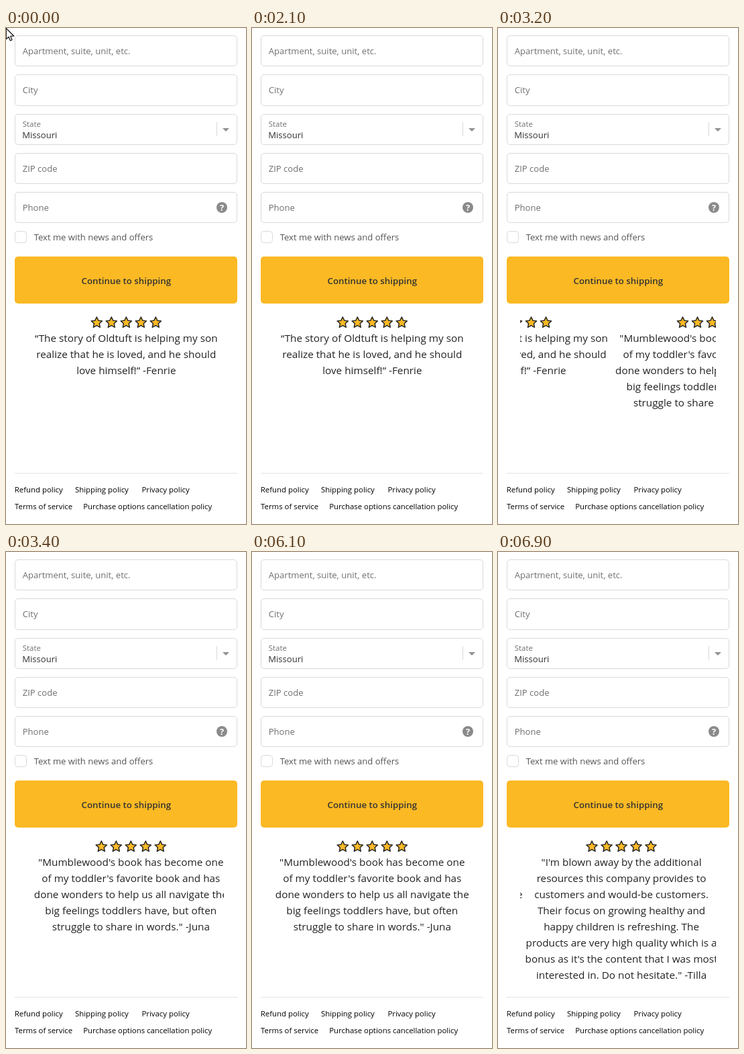
Recreate the animation shown at these times as an HTML page with a canvas. Size 358 by 738 pixels, loop 7000 ms.

```html
<!DOCTYPE html>
<html lang="en">
<head>
<meta charset="utf-8">
<title>Checkout form with reviews</title>
<style>
html, body { margin: 0; width: 100%; height: 100%; overflow: hidden; background: #fff; }
canvas { display: block; width: 358px; height: 738px; }
</style>
</head>
<body>
<canvas id="stage"></canvas>
<script>
const W = 358, H = 738, LOOP = 7000, STEP = 100;
const SLIDE_W = 292, SLIDE_MS = 515, SLIDE_STARTS = [2936, 6427];
const MID = 179.3, YELLOW = '#fbb924', BORDER = '#d9d9d9', GREY = '#707070', DARK = '#333';
const FIELD_TOP = 10.9, FIELD_PITCH = 58.3, FIELD_H = 46.3;

const canvas = document.getElementById('stage');
const ctx = canvas.getContext('2d');
const scale = window.devicePixelRatio || 1;
canvas.width = W * scale;
canvas.height = H * scale;

const reviews = [
  ['“The story of Oldtuft is helping my son', 'realize that he is loved, and he should',
   'love himself!” -Fenrie'],
  ['"Mumblewood\'s book has become one', 'of my toddler\'s favorite book and has',
   'done wonders to help us all navigate the', 'big feelings toddlers have, but often',
   'struggle to share in words." -Juna'],
  ['"I\'m blown away by the additional', 'resources this company provides to',
   'customers and would-be customers.', 'Their focus on growing healthy and',
   'happy children is refreshing. The', 'products are very high quality which is a',
   'bonus as it\'s the content that I was most', 'interested in. Do not hesitate." -Tilla']
];

function text(str, x, y, size, color, align = 'left', weight = 400) {
  ctx.font = `${weight} ${size}px "Open Sans", "Noto Sans", sans-serif`;
  ctx.textAlign = align;
  ctx.fillStyle = color;
  ctx.fillText(str, x, y);
}

function box(x, y, w, h, r, fill, stroke) {
  ctx.beginPath();
  ctx.roundRect(x, y, w, h, r);
  ctx.fillStyle = fill;
  ctx.fill();
  if (stroke) {
    ctx.strokeStyle = stroke;
    ctx.lineWidth = 1;
    ctx.stroke();
  }
}

function polygon(points, fill, stroke, width) {
  ctx.beginPath();
  points.forEach(([x, y]) => ctx.lineTo(x, y));
  ctx.closePath();
  ctx.fillStyle = fill;
  ctx.fill();
  if (stroke) {
    ctx.strokeStyle = stroke;
    ctx.lineWidth = width;
    ctx.lineJoin = 'round';
    ctx.stroke();
  }
}

// Edges snap to whole pixels, as page layout does.
function field(label, row) {
  const y = FIELD_TOP + row * FIELD_PITCH;
  const top = Math.round(y), bottom = Math.round(y + FIELD_H);
  box(13.5, top + 0.5, 331, bottom - top - 1, 4.5, '#fff', BORDER);
  text(label, 24.7, top + 28, 13.1, GREY);
}

function drawForm() {
  ['Apartment, suite, unit, etc.', 'City', '', 'ZIP code', 'Phone'].forEach(field);

  text('State', 24.7, 147, 11.5, GREY);
  text('Missouri', 24.2, 164, 13.1, DARK);
  ctx.fillStyle = BORDER;
  ctx.fillRect(314, 140, 1, 21);
  polygon([[323, 149], [333, 149], [328, 154]], '#919191');

  ctx.beginPath();
  ctx.arc(322, 267, 8, 0, Math.PI * 2);
  ctx.fillStyle = '#8a8a8a';
  ctx.fill();
  text('?', 322, 271.7, 13, '#fff', 'center', 700);

  box(13.5, 302.5, 17, 17, 4, '#fff', BORDER);
  text('Text me with news and offers', 41.7, 316, 13.05, '#545454');

  box(13, 340, 332, 70, 5, YELLOW);
  text('Continue to shipping', MID, 381, 13.3, DARK, 'center', 600);
}

function drawFooter() {
  ctx.fillStyle = '#e4e4e4';
  ctx.fillRect(13, 662, 332, 1);
  const links = [
    ['Refund policy', 12.7, 691], ['Shipping policy', 102.9, 691], ['Privacy policy', 202.4, 691],
    ['Terms of service', 13, 716], ['Purchase options cancellation policy', 115.2, 716]
  ];
  for (const [label, x, y] of links) text(label, x, y, 11.4, '#000');
}

function star(cx, cy) {
  const points = [];
  for (let i = 0; i < 10; i++) {
    const r = i % 2 ? 4.1 : 8.5;
    const a = (i / 5 - 0.5) * Math.PI;
    points.push([cx + r * Math.cos(a), cy + r * Math.sin(a)]);
  }
  polygon(points, YELLOW, '#262626', 1.5);
}

function drawReview(lines, x) {
  for (let i = -2; i <= 2; i++) star(x + i * 22, 438.5);
  lines.forEach((line, i) => text(line, x, 467 + i * 24, 15.3, '#222', 'center'));
}

function swing(p) {
  const c = Math.min(1, Math.max(0, p));
  return 0.5 - 0.5 * Math.cos(Math.PI * c);
}

function drawCarousel(t) {
  const pos = SLIDE_STARTS.reduce((sum, start) => sum + swing((t - start) / SLIDE_MS), 0);
  ctx.save();
  ctx.beginPath();
  ctx.rect(33, 424, SLIDE_W, 220);
  ctx.clip();
  reviews.forEach((lines, i) => {
    const dx = (i - pos) * SLIDE_W;
    if (Math.abs(dx) < SLIDE_W) drawReview(lines, MID + dx);
  });
  ctx.restore();
}

function drawCursor() {
  polygon([[0.3, 0.5], [0.3, 16.5], [4, 13.2], [6.4, 18.8], [9, 17.7], [6.7, 12.2], [11.8, 12]],
    '#fff', '#111', 1.2);
}

function draw(now) {
  // The picture advances in steps of a tenth of a second.
  const t = Math.floor((now % LOOP) / STEP) * STEP;
  ctx.setTransform(scale, 0, 0, scale, 0, 0);
  ctx.fillStyle = '#fff';
  ctx.fillRect(0, 0, W, H);
  drawForm();
  drawCarousel(t);
  drawFooter();
  if (t < 100) drawCursor();
}

const begin = performance.now();
function tick() {
  draw(performance.now() - begin);
  requestAnimationFrame(tick);
}
tick();
</script>
</body>
</html>
```
